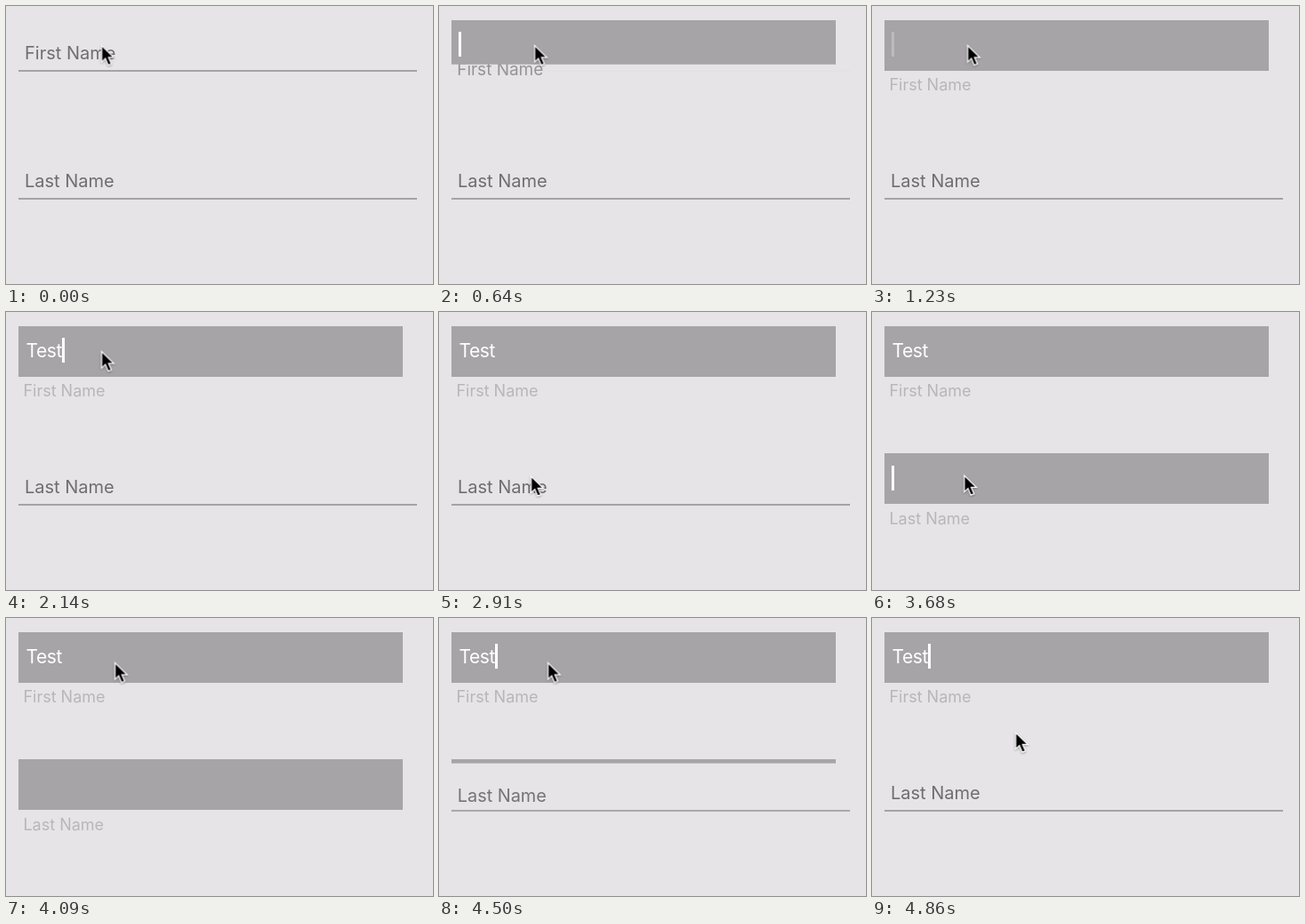
These frames come from a looping animation (480 px wide and 313 px high, 4.9 s). An HTML page:

```html
<!DOCTYPE html>
<html lang="en">
<head>
<meta charset="utf-8">
<title>Text field focus</title>
<style>
  html, body { margin: 0; width: 100%; height: 100%; overflow: hidden; background: #e6e4e7; }
  .stage { position: relative; width: 480px; height: 313px; overflow: hidden; font-family: Inter, Roboto, sans-serif; }
  .stage * { position: absolute; }
  .field { left: 0; top: 0; width: 480px; height: 110px; }
  .last { top: 143.5px; }
  .label, .line, .box, .text, .caret, .pointer { animation: 4.9s linear infinite; }

  .label { left: 21.2px; top: 41px; font-size: 20px; line-height: 24px; white-space: nowrap; color: #6f6d70; transform-origin: 0 50%; }
  .line { left: 14px; top: 72px; width: 448px; height: 2px; background: #a5a3a6; }
  .box { left: 14px; top: 15.5px; width: 432px; height: 56.5px; background: #a6a4a7; transform-origin: 0 0; }
  .text { left: 22.5px; top: 30px; height: 28px; overflow: hidden; font-size: 21px; line-height: 27px; letter-spacing: -.4px; white-space: nowrap; color: #fff; }
  .caret { left: 22.3px; top: 29px; width: 2.5px; height: 28px; background: #fff; }
  .pointer { left: 0; top: 0; overflow: visible; filter: drop-shadow(0 1px 1px #0005); }

  .first .label { animation-name: first-label; }
  .first .line { animation-name: first-line; }
  .first .box { animation-name: first-box; }
  .first .caret { animation-name: first-caret, caret-step; animation-timing-function: linear, step-end; }
  .text { animation-name: type; animation-timing-function: step-end; }
  .last .label { animation-name: last-label; }
  .last .line { animation-name: last-line; }
  .last .box { animation-name: last-box; }
  .last .caret { animation-name: last-caret; }
  .pointer { animation-name: point; }

  /* First field opens at 545 ms */
  @keyframes first-label {
    0%, 11.12% { transform: none; color: #6f6d70; animation-timing-function: ease; }
    17.65%, 100% { transform: translate(-1.6px, 35.5px) scale(.9); color: #b8b6b9; }
  }
  @keyframes first-line {
    0%, 11.12% { opacity: 1; }
    11.13% { opacity: .08; }
    17.65%, 100% { opacity: 0; }
  }
  @keyframes first-box {
    0%, 11.12% { transform: scaleY(0); animation-timing-function: cubic-bezier(.1, .85, .2, 1); }
    17.65%, 100% { transform: none; }
  }
  @keyframes first-caret {
    0%, 11.12% { opacity: 0; }
    11.13%, 22.8% { opacity: 1; }
    25.9%, 30.6% { opacity: 0; }
    30.61%, 55.5% { opacity: 1; }
    58.4%, 87.04% { opacity: 0; }
    87.05%, 100% { opacity: 1; }
  }
  @keyframes caret-step {
    0% { transform: none; }
    30.61% { transform: translateX(13px); }
    34.28% { transform: translateX(23px); }
    39.79% { transform: translateX(34px); }
    43.67%, 100% { transform: translateX(41px); }
  }
  @keyframes type {
    0% { width: 0; }
    30.61% { width: 12px; }
    34.28% { width: 22.8px; }
    39.79% { width: 33.8px; }
    43.67%, 100% { width: 50px; }
  }

  /* Last field opens at 3225 ms and closes at 4265 ms */
  @keyframes last-label {
    0%, 65.82% { transform: none; color: #6f6d70; animation-timing-function: ease; }
    72.35%, 87.04% { transform: translate(-1.6px, 35.5px) scale(.9); color: #b8b6b9; animation-timing-function: ease; }
    94.39%, 100% { transform: none; color: #6f6d70; }
  }
  @keyframes last-line {
    0%, 65.82% { opacity: 1; }
    65.83% { opacity: .08; }
    72.35%, 87.04% { opacity: 0; animation-timing-function: ease; }
    94.39%, 100% { opacity: 1; }
  }
  @keyframes last-box {
    0%, 65.82% { transform: scaleY(0); animation-timing-function: cubic-bezier(.1, .85, .2, 1); }
    72.35%, 87.04% { transform: none; animation-timing-function: ease; }
    94.39%, 100% { transform: scaleY(0); }
  }
  @keyframes last-caret {
    0%, 65.82% { opacity: 0; }
    65.83%, 77.6% { opacity: 1; }
    80.6%, 100% { opacity: 0; }
  }

  @keyframes point {
    0%, 49.5% { transform: translate(107.5px, 44.5px); animation-timing-function: ease-in-out; }
    59.2%, 74.6% { transform: translate(103.5px, 185px); animation-timing-function: ease-in-out; }
    83.3%, 97.8% { transform: translate(122.5px, 50.5px); animation-timing-function: ease-in; }
    99.18%, 100% { transform: translate(161.5px, 129px); }
  }
</style>
</head>
<body>
<div class="stage">
  <div class="field first">
    <div class="label">First Name</div>
    <div class="line"></div>
    <div class="box"></div>
    <div class="text">Test</div>
    <div class="caret"></div>
  </div>
  <div class="field last">
    <div class="label">Last Name</div>
    <div class="line"></div>
    <div class="box"></div>
    <div class="caret"></div>
  </div>
  <svg class="pointer" width="16" height="25">
    <path d="M0 0V18.6L4.2 14.6 7.4 22.2 11 20.7 7.8 13.3H13.6Z" fill="#000" stroke="#fff" stroke-width="1.3"/>
  </svg>
</div>
</body>
</html>
```
